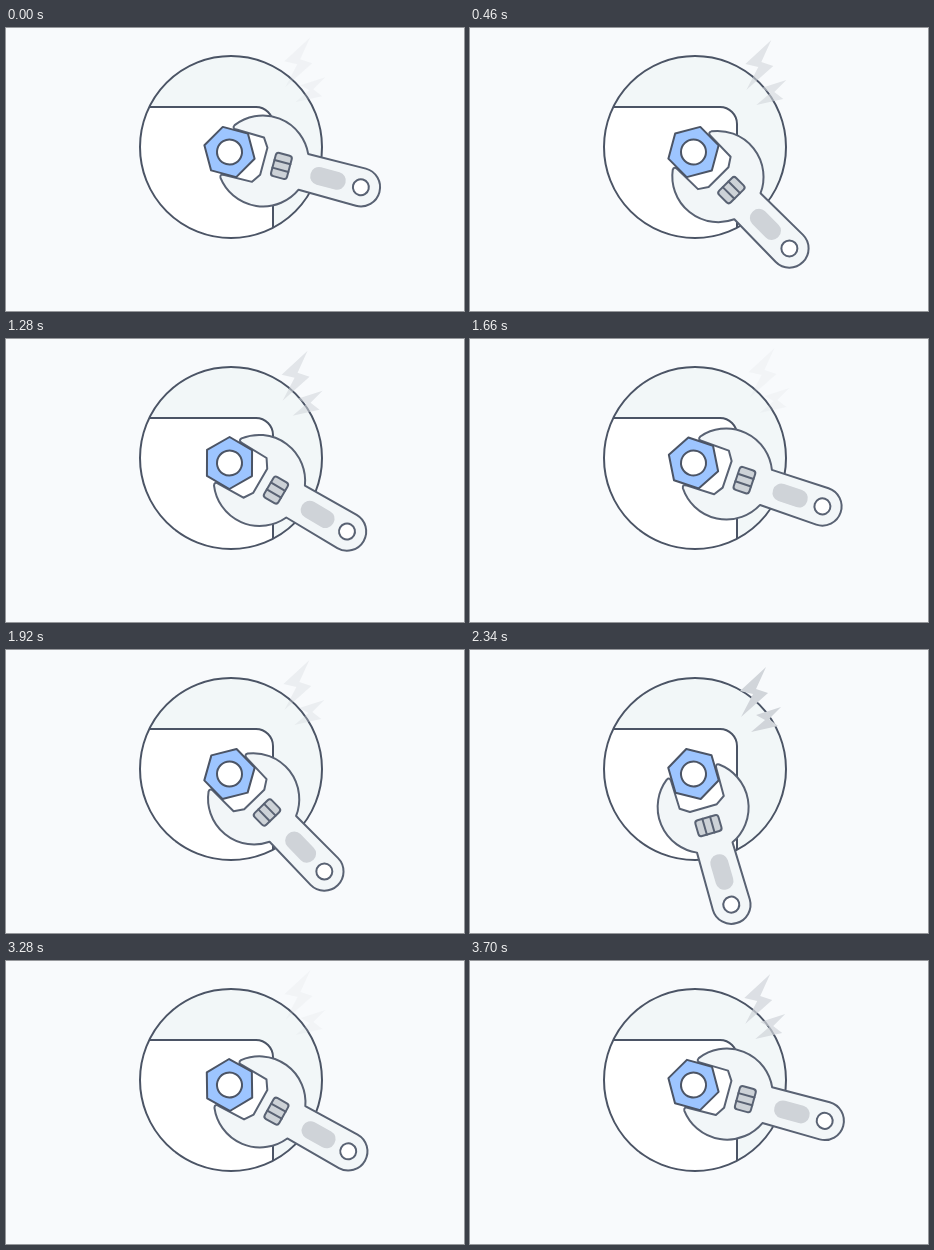
Write an HTML page that moves like this. It is 458x283 px and loops after 3.72 s.

```html
<!DOCTYPE html>
<html lang="en">
<head>
<meta charset="utf-8">
<title>Wrench and nut</title>
<style>
  html, body { margin: 0; width: 100%; height: 100%; overflow: hidden; background: #f8fafc; }
  svg { display: block; width: 458px; height: 283px; }
  .line { stroke: #4b5465; stroke-width: 2; stroke-linejoin: round; stroke-linecap: round; }
  .tool { stroke: #596273; }
</style>
</head>
<body>
<svg viewBox="0 0 458 283">
  <defs>
    <clipPath id="disc"><circle cx="225" cy="119" r="91"/></clipPath>
  </defs>

  <circle cx="225" cy="119" r="91" fill="#f2f7f8"/>
  <g clip-path="url(#disc)">
    <rect class="line" x="100" y="79" width="167" height="160" rx="17" fill="#fff"/>
  </g>
  <circle class="line" cx="225" cy="119" r="91" fill="none"/>

  <g id="bolts" fill="#d1d5da">
    <path d="M296 17L270 41L283 44L271 67L298 43L286 39Z"/>
    <path d="M311 57L286 65L295 70L281 82L308 76L299 69Z"/>
  </g>

  <g id="wrench">
    <path class="line tool" fill="#f2f6f8" d="M-2-27.3A46 46 0 0 1 76.5-18.5L136-19.2A19.2 19.2 0 0 1 136 19.2L76.5 18.5
      A46 46 0 0 1-2 27.3Q-4 23.5 1 23.5L29.5 23L35.5 14V-14L29.5-23L1-23.5Q-4-23.5-2-27.3Z"/>
    <rect x="84" y="-9" width="36" height="18" rx="8.5" fill="#cfd3d8"/>
    <g class="line tool" fill="#cdd2d7">
      <rect x="45.5" y="-12" width="16.5" height="24" rx="3"/>
      <path d="M45.5-4H62M45.5 4H62"/>
    </g>
    <circle class="line tool" cx="136" r="8" fill="#fff"/>
    <path class="line" id="nut" fill="#9dc5ff"/>
    <circle class="line" r="12.5" fill="#fff"/>
  </g>
</svg>
<script>
  const LOOP = 3720;
  const $ = id => document.getElementById(id);
  const bolts = $('bolts'), wrench = $('wrench');

  // Steps are [time, value, sharpness of the ease leading into it].
  const turn = [[0, 15], [100, 15, 1], [820, 75, 2], [1550, 15, 2], [2280, 75, 1.6], [2800, 45, 1.6], [3720, 15, 1.2]];
  const drift = [[0, .97], [200, 1, 1], [820, 0, 1.6], [1550, 1, 1.2], [1780, 1, 1], [2300, 0, 1.9],
                 [3200, 1, 1.85], [3300, 1, 1], [4100, 0, 1.6]];

  const ease = (x, p) => x ** p / (x ** p + (1 - x) ** p);

  function valueAt(steps, t) {
    const i = steps.findIndex(s => s[0] > t);
    const [t0, v0] = steps[i - 1], [t1, v1, p] = steps[i];
    return v0 + (v1 - v0) * ease((t - t0) / (t1 - t0), p);
  }

  const corners = Array.from({ length: 6 }, (_, i) => {
    const a = i * Math.PI / 3;
    return `${26 * Math.cos(a)} ${26 * Math.sin(a)}`;
  });
  $('nut').setAttribute('d', `M${corners.join('L')}Z`);

  function draw(now) {
    const t = now % LOOP;
    const s = valueAt(drift, t);
    wrench.setAttribute('transform', `translate(223.5 124) rotate(${valueAt(turn, t)})`);
    bolts.setAttribute('transform', `translate(${8.5 * s} ${-8 * s})`);
    bolts.setAttribute('opacity', 1 - .85 * s ** 1.5);
  }

  const start = performance.now();
  function tick() {
    draw(performance.now() - start);
    requestAnimationFrame(tick);
  }
  tick();
</script>
</body>
</html>
```
